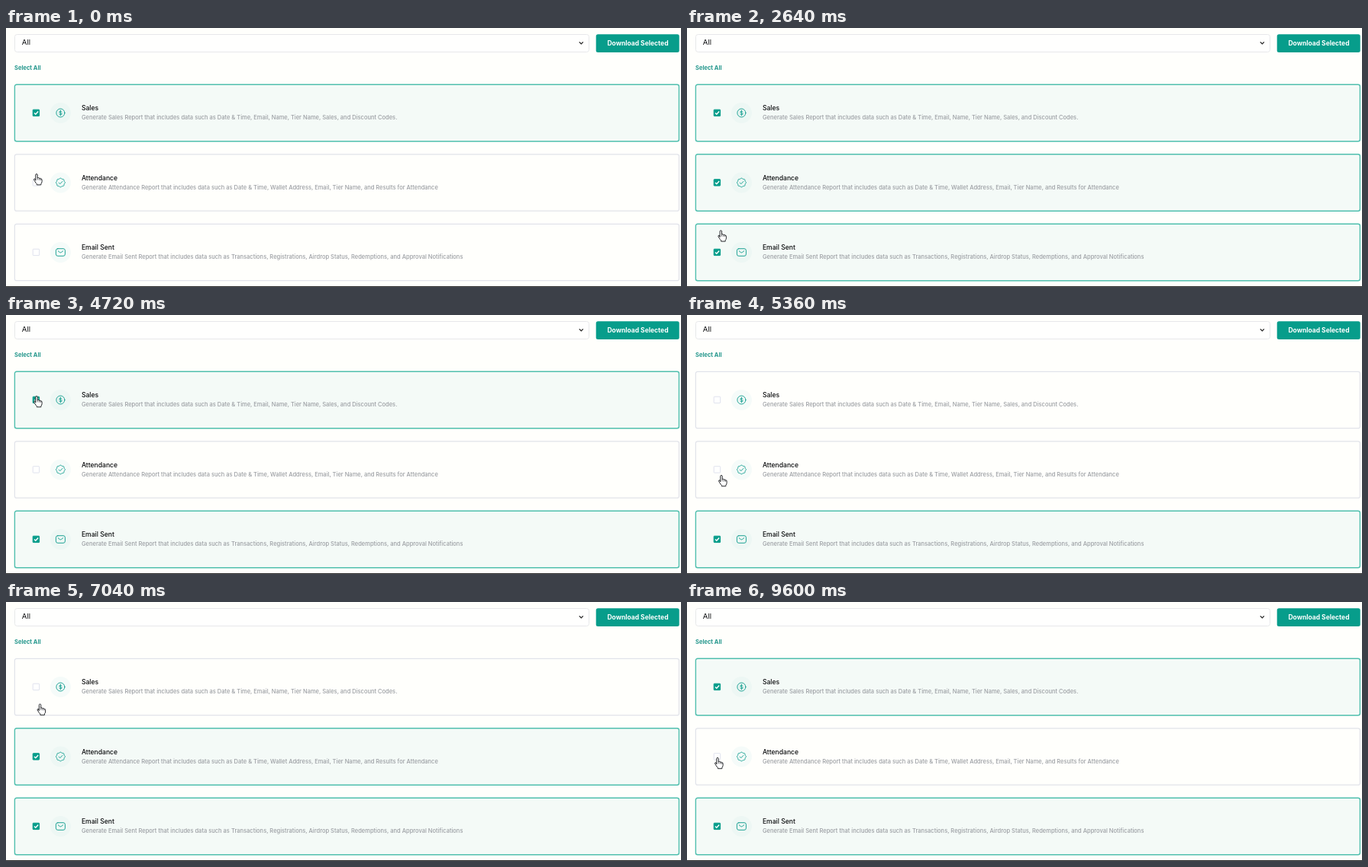
An HTML page for the animation above (9.68 s loop, 884x340 px).

```html
<!DOCTYPE html>
<html lang="en">
<head>
<meta charset="utf-8">
<title>Reports</title>
<style>
  html, body { margin: 0; width: 100%; height: 100%; overflow: hidden; background: #fffffc; }
  svg { display: block; width: 884px; height: 340px; font-family: Inter, Roboto, sans-serif; }
  .link { font-size: 7.5px; font-weight: 700; fill: #24978c; }
  .title { font-size: 8.6px; font-weight: 500; fill: #0c0d0f; }
  .desc { font-size: 7.5px; font-weight: 500; fill: #9b9ea3; }
  .frame { fill: #fffffc; stroke: #e1e3ea; stroke-width: 1.2; }
  .on .frame { fill: #f4faf7; stroke: #50bfae; stroke-width: 1.4; }
  .halo { fill: #f5fbf9; }
  .on .halo { fill: #edf7f4; }
  .box { fill: #fffffe; stroke: #e0e3ee; }
  .on .box { fill: #079d8b; stroke: #079d8b; }
  .tick { display: none; fill: none; stroke: #fff; stroke-width: 1.4; }
  .on .tick { display: inline; }
  .icon { fill: none; stroke: #159f90; stroke-width: .95; stroke-linecap: round; stroke-linejoin: round; }
</style>
</head>
<body>
<svg viewBox="0 0 884 340">
  <rect width="884" height="340" fill="#fffffc"/>
  <rect x="11.5" y="8.5" width="752" height="23" rx="3" fill="#fffffe" stroke="#e7e8ea"/>
  <text x="20.8" y="22.4" font-size="9.6" fill="#0c0d0f">All</text>
  <path d="M750.8 18.4l2.5 2.5 2.5-2.5" fill="none" stroke="#222" stroke-width="1.3"/>
  <rect x="772.7" y="8.2" width="109" height="23.8" rx="2.5" fill="#079d8b"/>
  <text x="827.5" y="23.1" text-anchor="middle" font-size="8.5" font-weight="700" fill="#fff">Download Selected</text>
  <text class="link" x="11" y="54.8">Select All</text>
  <g id="cards"></g>
  <rect y="339" width="884" height="1" fill="#222"/>
  <g id="hand" stroke="#26282b" stroke-linejoin="round" stroke-linecap="round">
    <path fill="#fff" d="M-2.7 1.2V-5.7q0-1.3 1.2-1.3t1.2 1.3v3.8q1.9-.7 2.3.6 1.6-.6 2 .7 1.6-.2 1.6 1.3V3q0 1.6-1.2 2.8v1.5h-5.6V6q-1.5-1.2-2.4-3.1l-1.3-2.1q-.4-1.3.8-1.4z"/>
    <path fill="none" stroke-width=".7" d="M-.3-1.9V.5M2-1.3V.8M4-.6V1"/>
  </g>
</svg>
<script>
const LOOP = 9680, STEP = 80, TOP = 74.3, PITCH = 91.5, BOX_Y = 37.2;

const badge = Array.from({ length: 48 }, (_, i) => {
  const a = i * Math.PI / 24, r = 5.5 + 0.4 * Math.cos(8 * a);
  return `${(r * Math.cos(a)).toFixed(2)} ${(r * Math.sin(a)).toFixed(2)}`;
}).join('L');

const reports = [
  { title: 'Sales', on: true,
    desc: 'Generate Sales Report that includes data such as Date & Time, Email, Name, Tier Name, Sales, and Discount Codes.',
    icon: '<circle r="5.5"/><path stroke-width=".9" d="M1.7-1.5Q1.3-2.3 0-2.3-1.7-2.3-1.7-1.1-1.7 0 0 0 1.8.1 1.8 1.2 1.8 2.4 0 2.4-1.4 2.4-1.8 1.5M0-3.3V3.3"/>' },
  { title: 'Attendance', on: false,
    desc: 'Generate Attendance Report that includes data such as Date & Time, Wallet Address, Email, Tier Name, and Results for Attendance',
    icon: `<path d="M${badge}z"/><path d="M-2.2.1L-.6 1.7 2.4-1.5"/>` },
  { title: 'Email Sent', on: false,
    desc: 'Generate Email Sent Report that includes data such as Transactions, Registrations, Airdrop Status, Redemptions, and Approval Notifications',
    icon: '<rect x="-6" y="-4.8" width="12" height="9.6" rx="2.4"/><path d="M-3.2-1.7L-.9.1Q0 .7.9.1L3.2-1.7"/>' }
];

// The cursor rests at a row between arrive and leave; a click lands as it leaves
const visits = [
  { row: 0.93, arrive: 0, leave: 0 },
  { row: 1, arrive: 320, leave: 480, click: true },
  { row: 2, arrive: 1760, leave: 2320, click: true },
  { row: 1, arrive: 3280, leave: 3520, click: true },
  { row: 2, arrive: 4240, leave: 4240 },
  { row: 0, arrive: 4720, leave: 4880, click: true },
  { row: 2, arrive: 5760, leave: 6000 },
  { row: 1, arrive: 6400, leave: 6480, click: true },
  { row: 0, arrive: 7360, leave: 7920, click: true },
  { row: 1, arrive: 8560, leave: 8880, click: true },
  { row: 1.07, arrive: 9600, leave: LOOP }
];

const cardSvg = ({ title, desc, icon }, i) => `
  <g transform="translate(0 ${TOP + i * PITCH})">
    <rect class="frame" x="11.4" width="870" height="74.4" rx="2.5"/>
    <rect class="box" x="35.2" y="32.9" width="8.4" height="8.4" rx=".6"/>
    <path class="tick" d="M37 37.2l1.8 1.8 3.4-3.8"/>
    <circle class="halo" cx="71.4" cy="${BOX_Y}" r="13.5"/>
    <g class="icon" transform="translate(71.4 ${BOX_Y})">${icon}</g>
    <text class="title" x="98.9" y="34">${title}</text>
    <text class="desc" x="99" y="45.9">${desc.replace('&', '&amp;')}</text>
  </g>`;

const list = document.getElementById('cards');
const hand = document.getElementById('hand');
list.innerHTML = reports.map(cardSvg).join('');

const ease = u => u * u * (3 - 2 * u);

function cursorAt(t) {
  const next = visits.findIndex(v => v.leave > t);
  const from = visits[next - 1], to = visits[next];
  const u = Math.min(1, (t - from.leave) / (to.arrive - from.leave));
  const row = from.row + (to.row - from.row) * ease(u);
  const sway = 5 * Math.abs(to.row - from.row) * Math.sin(Math.PI * u);
  return [41.5 + Math.min(sway, 5), TOP + BOX_Y + 2 + row * PITCH];
}

function draw(t) {
  reports.forEach((r, i) => {
    const clicks = visits.filter(v => v.click && v.row === i && v.leave <= t).length;
    list.children[i].classList.toggle('on', r.on !== (clicks % 2 === 1));
  });
  hand.setAttribute('transform', `translate(${cursorAt(t).join(' ')})`);
}

const start = performance.now();
function tick() {
  const t = (performance.now() - start) % LOOP;
  draw(Math.floor(t / STEP) * STEP);
  requestAnimationFrame(tick);
}
tick();
</script>
</body>
</html>
```
